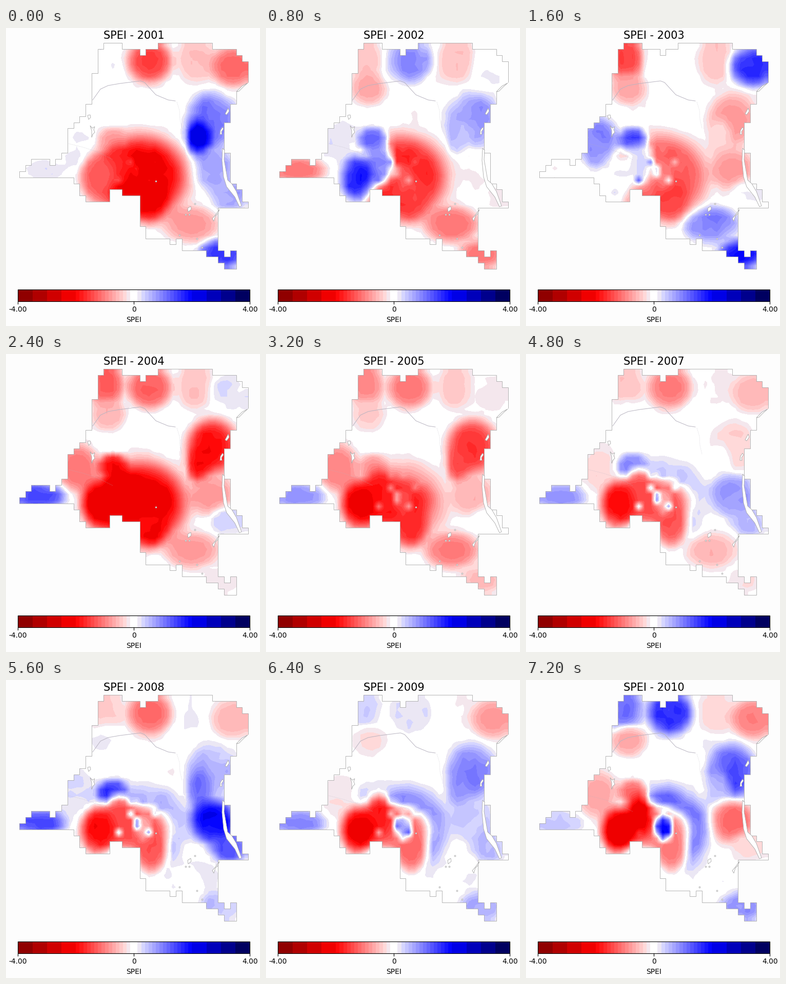
Animation of 495 by 580 pixels, one loop 8 s. Source, as a matplotlib script:

```python
import numpy as np
import matplotlib.pyplot as plt
from matplotlib.animation import FuncAnimation
from matplotlib.colors import BoundaryNorm, ListedColormap, Normalize
from matplotlib.patches import Polygon, Rectangle

W, H, DPI = 495, 580, 100
PAPER, EDGE = "#fdfdfd", "#a8a8a8"
COLS, ROWS = 38, 37
X0, X1, Y0, Y1 = 26, 472, 29, 469
CW, CH = (X1 - X0) / COLS, (Y1 - Y0) / ROWS

# Border in cell units, alternating x and y after the first corner
BORDER = [14, 0, 17, 1, 20, 2, 21, 1, 23, 0, 32, 1, 36, 2, 37, 3, 38, 8, 36, 10,
          35, 13, 34, 18, 35, 23, 36, 24, 37, 26, 38, 27, 33, 34, 34, 35, 35, 34,
          36, 37, 34, 36, 33, 35, 31, 34, 27, 32, 26, 33, 25, 32, 21, 30, 20, 25,
          17, 24, 15, 26, 11, 25, 10, 23, 9, 22, 0, 21, 1, 20, 2, 19, 5, 20, 6, 19,
          7, 18, 8, 14, 9, 13, 10, 12, 11, 10, 12, 5, 13, 1]

# Fixed climate zones, painted in this order: x, y, rx, ry
ZONES = [
    (195, 60, 34, 48),    # north-west
    (200, 118, 36, 32),   # river bend
    (280, 65, 44, 42),    # north
    (370, 62, 38, 48),    # north, middle
    (442, 75, 44, 40),    # north-east
    (140, 222, 40, 48),   # west
    (62, 277, 54, 26),    # coast
    (402, 180, 50, 54),   # east
    (376, 215, 24, 38),   # east, core
    (402, 275, 44, 42),   # lakes
    (435, 325, 38, 30),   # south-east
    (362, 382, 54, 36),   # south
    (420, 440, 44, 28),   # south, tip
    (262, 290, 91, 82),   # basin ring
    (242, 287, 78, 47),   # basin
    (208, 218, 30, 24),   # basin, north-west
    (220, 265, 28, 42),   # basin, inner west
    (180, 292, 34, 46),   # basin, west
    (282, 328, 34, 48),   # basin, south
    (268, 287, 16, 26),   # basin, heart
]

# Index of each zone by year, in the order above
INDEX = {
    2001: [.1, .1, -1.5, -.5, -1.2, .15, .17, 1.1, 2, .7,
           .7, -.8, 1.6, -2.2, -2.2, -.8, -1.8, -1.3, -2.2, -2.4],
    2002: [-.5, -.7, .9, -.5, .1, .2, -1.1, .8, .5, -.1,
           -.15, -1.1, -1.1, -1.9, -1.7, 1.2, 1, 1.7, -1.6, -1.3],
    2003: [-1.5, -.7, 0, -.5, 1.6, .9, -.1, -.8, -.3, -.8,
           .1, .9, 1.9, -1.5, -1.1, 1.5, .4, .1, -1.5, -1],
    2004: [-1.3, -.6, -1.3, -.5, .2, -1.1, 1.3, -1.9, -1.9, -.8,
           .4, -.8, -.2, -2.2, -2.3, -1.9, -2.3, -2.2, -2.1, -2.3],
    2006: [-.6, -.2, -.9, -.4, -.6, -.9, .2, -1.3, -1, -.4,
           -.3, -1.3, -.9, .35, -1.5, .4, -1.4, -2, -1.4, -.6],
    2008: [-.4, .1, -1.2, .1, -.6, .3, 1.3, .6, 1, 2,
           1.5, .17, .5, .9, -1.5, 1.8, -1.4, -2, -1.4, -.6],
    2010: [1.1, -.7, 1.6, -.3, -1, -.7, .45, 1.3, .5, -1.2,
           -.3, .1, .9, 1.5, -1.2, -1.2, -2.2, -2.3, -1.1, 2.1],
}

# How strongly single wet cells break up the basin
SPECKLE = {2001: .4, 2002: .7, 2003: 1.2, 2004: .1, 2006: 1.7, 2008: 1.7, 2010: .4}

cx = X0 + CW * (np.arange(COLS) + .5)
cy = (Y0 + CH * (np.arange(ROWS) + .5))[:, None]
wet = np.random.default_rng(4).random((ROWS, COLS)) < .14


def pull(x, y, rx, ry):
    """Soft-edged ellipse: one inside, zero outside."""
    d = np.hypot((cx - x) / rx, (cy - y) / ry)
    return np.exp(-d ** 5)


def hat_weights(size, n):
    """Linear interpolation matrix from n cell centres to size pixels."""
    u = np.clip((np.arange(size) + .5) * n / size - .5, 0, n - 1)
    return np.maximum(0, 1 - abs(u[:, None] - np.arange(n)))


def ripple(year):
    noise = np.random.default_rng(year).normal(0, 1, (ROWS, COLS))
    for axis in (0, 1):
        noise = (noise + np.roll(noise, 1, axis) + np.roll(noise, -1, axis)) / 3 ** .5
    return noise


def cells(year):
    field = np.zeros((ROWS, COLS))
    for zone, value in zip(ZONES, INDEX[year]):
        field += (value - field) * pull(*zone)
    field += SPECKLE[year] * wet * pull(235, 285, 72, 48)
    noise = ripple(year)
    return field * (1 + .06 * noise) + .05 * noise


wx, wy = hat_weights(X1 - X0, COLS), hat_weights(Y1 - Y0, ROWS)
known = {year: cells(year) for year in INDEX}
maps = []
for year in range(2001, 2011):
    if year in known:
        field = known[year]
    else:
        field = (known[year - 1] + known[year + 1]) / 2
    maps.append(np.clip(wy @ field @ wx.T, -3.99, 3.99))

# Bands of 0.125 near zero and 0.5 beyond two
levels = np.concatenate([np.arange(-4, -2, .5), np.arange(-2, 2, .125),
                         np.arange(2, 4.1, .5)])
mids = (levels[:-1] + levels[1:]) / 2
colors = plt.get_cmap("seismic_r")(Normalize(-4, 4)(mids))
colors[abs(mids) < .125, :3] = 1
colors[np.isclose(mids, .1875), :3] = (.925, .906, .96)
colors[np.isclose(mids, -.1875), :3] = (.957, .906, .933)
cmap = ListedColormap(colors)
norm = BoundaryNorm(levels, len(mids))

fig = plt.figure(figsize=(W / DPI, H / DPI), dpi=DPI, facecolor=PAPER)
ax = fig.add_axes([0, 0, 1, 1])
ax.axis("off")

corners = [(BORDER[0], BORDER[1])]
for i, v in enumerate(BORDER[2:]):
    px, py = corners[-1]
    corners.append((px, v) if i % 2 else (v, py))
corners.append((BORDER[0], corners[-1][1]))
border = Polygon([(X0 + CW * c, Y0 + CH * r) for c, r in corners],
                 fc="none", ec=EDGE, lw=.6, zorder=3)
ax.add_patch(border)
image = ax.imshow(maps[0], cmap=cmap, norm=norm, extent=(X0, X1, Y1, Y0),
                  interpolation="nearest", aspect="auto", zorder=1)
image.set_clip_path(border)
ax.set(xlim=(0, W), ylim=(H, 0))


def water(points, fc="white", ec=EDGE):
    ax.add_patch(Polygon(points, fc=fc, ec=ec, lw=.6, zorder=4))


def stream(points, lw=.6, style="-"):
    ax.plot(*zip(*points), color="#b8b4c0", lw=lw, ls=style, zorder=2)


# Lakes
water([(473, 106), (473, 126), (449.5, 124.8)], PAPER, "none")
water([(471, 107), (460, 113), (449, 124), (454, 123), (463, 114)])
water([(422, 234), (426, 238), (425, 256), (432, 296), (440, 303), (449, 318),
       (459, 346), (455, 348), (446, 329), (430, 309), (424, 290), (421, 258)])
water([(422, 193), (424, 196), (420, 202), (421, 207), (417, 207), (418, 199)])
water([(433, 156), (435, 162), (430, 169), (427, 167)])
water([(416, 353), (413, 361), (408, 366), (405, 376), (402, 371), (408, 364)])
water([(164, 190), (168, 195), (173, 192), (171, 198), (173, 203), (169, 207),
       (167, 213), (167, 200)])
water([(159, 170), (164, 169), (165, 174), (161, 178)])
water([(354, 351), (360, 347), (361, 353), (355, 358)])

# Rivers
stream([(169, 140), (184, 119), (199, 112), (222, 108), (262, 103), (270, 106),
        (292, 130), (316, 140), (330, 142)], .7)
stream([(333, 144), (338, 160), (339, 178), (343, 195)], .4, ":")
stream([(122, 225), (150, 232), (178, 241), (208, 256)], .4, ":")

ponds = [(368, 342), (350, 363), (357, 363), (338, 403), (372, 410), (382, 427),
         (292, 298)]
ax.scatter(*zip(*ponds), s=4, fc="white", ec=EDGE, lw=.6, zorder=4)

# Colour bar
MID, UNIT, TOP, BOTTOM = 249.4, 56.5, 508.6, 531.6
for a, b, color in zip(levels[:-1], levels[1:], colors):
    ax.add_patch(Rectangle((MID + a * UNIT, TOP), (b - a) * UNIT, BOTTOM - TOP,
                           fc=color, lw=0, antialiased=False))
ax.add_patch(Rectangle((MID - 4 * UNIT, TOP), 8 * UNIT, BOTTOM - TOP,
                       fc="none", ec="black", lw=.8, zorder=3))


def label(x, y, text, size=10):
    return ax.text(x, y, text, size=size, ha="center", va="baseline",
                   family="DejaVu Sans", color="black")


for value, text in ((-4, "-4.00"), (0, "0"), (4, "4.00")):
    x = MID + value * UNIT
    ax.plot([x, x], [BOTTOM, BOTTOM + 5], color="black", lw=.8)
    label(x, 552, text)
label(249, 572, "SPEI")
title = label(249, 21, "", 15)


def update(i):
    image.set_data(maps[i])
    title.set_text(f"SPEI - {2001 + i}")
    return image, title


anim = FuncAnimation(fig, update, frames=10, interval=800, repeat=True,
                     repeat_delay=0, blit=False)
plt.show()
```
